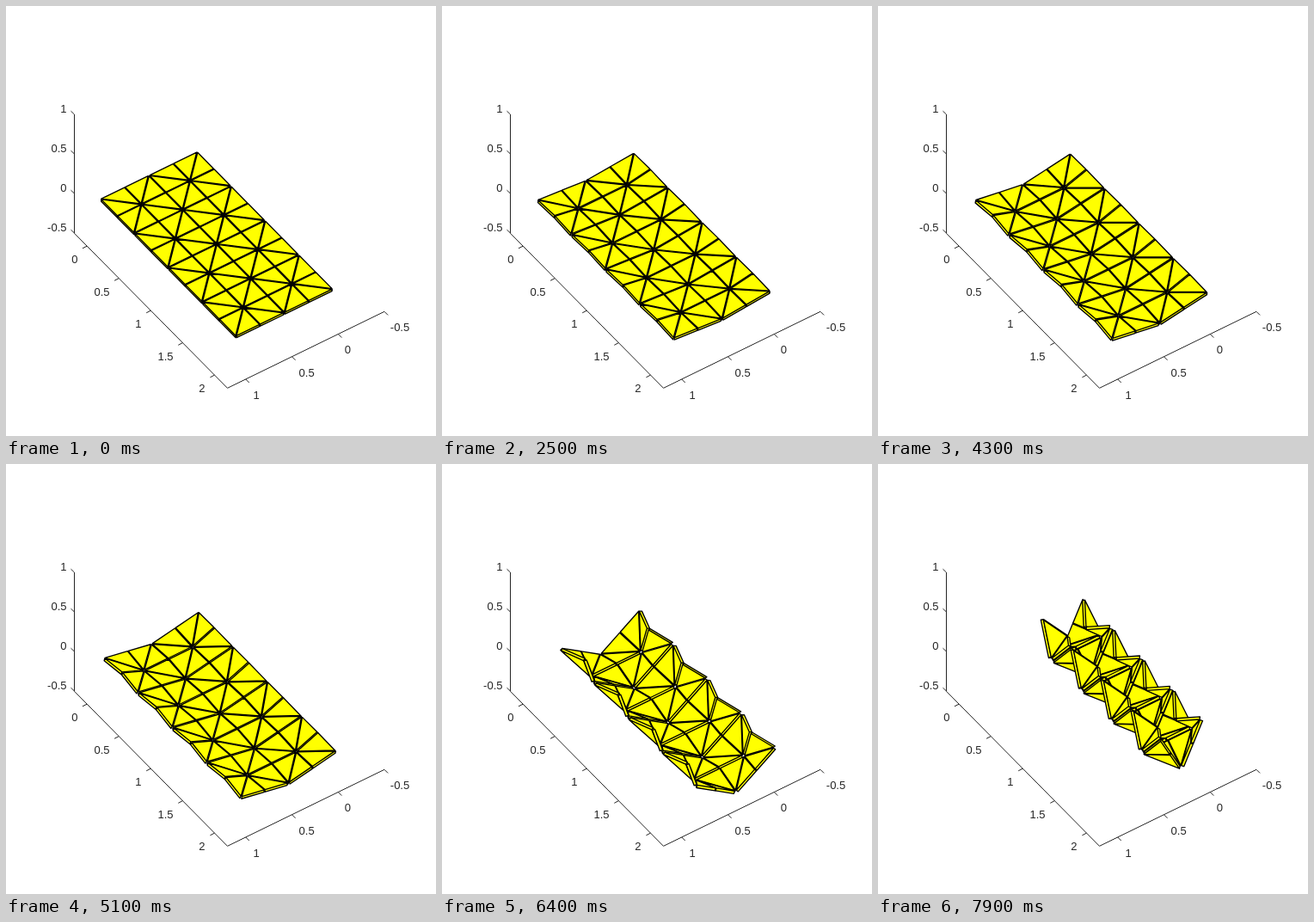
Animation, 500 px wide and 500 px high, one loop 8 s. Source, as an HTML page:

```html
<!DOCTYPE html>
<html lang="en">
<head>
<meta charset="utf-8">
<title>Folding thick panels</title>
<style>
html, body { margin: 0; width: 100%; height: 100%; overflow: hidden; background: #fff; }
svg { display: block; width: 100%; height: 100%; }
text { font: 13px "Liberation Sans", Arial, sans-serif; fill: #262626; }
#axes { fill: none; stroke: #262626; stroke-width: 1; }
#sheet { fill: #ff0; stroke: #000; stroke-width: 1.35; stroke-linejoin: round; }
</style>
</head>
<body>
<svg viewBox="0 0 500 500">
  <path id="axes"/>
  <g id="labels"></g>
  <g id="sheet"></g>
</svg>
<script>
const NS = "http://www.w3.org/2000/svg";
const LOOP = 8000, STEP = 100, HOLD = 4;
const COLS = 4, ROWS = 8;
const A = 0.2625, H = 0.2665, THICK = 0.025, INSET = 0.945;
const VIEW = [0.402, 0.584, 0.705];

const add = (tag, parent) => parent.appendChild(document.createElementNS(NS, tag));
const dot = (a, b) => a[0] * b[0] + a[1] * b[1] + a[2] * b[2];
const sub = (a, b) => a.map((v, i) => v - b[i]);
const cross = (a, b) => [a[1] * b[2] - a[2] * b[1], a[2] * b[0] - a[0] * b[2], a[0] * b[1] - a[1] * b[0]];
const project = ([x, y, z]) => [-107.6 * x + 74 * y, 52.4 * x + 75 * y - 92 * z];

function drawAxes() {
  const labels = document.getElementById("labels");
  let d = "M79.5 126V264.3L257.5 444.3L440 355.3";
  const tick = (x, y, dx, dy) => { d += `M${x} ${y}l${dx} ${dy}`; };
  const label = (str, x, y, anchor) => {
    const el = add("text", labels);
    el.setAttribute("x", x);
    el.setAttribute("y", y);
    el.setAttribute("text-anchor", anchor);
    el.textContent = str;
  };
  ["1", "0.5", "0", "-0.5"].forEach((s, i) => {
    tick(79.5, 126 + 46 * i, -4, -3.8);
    label(s, 70.5, 124 + 46 * i, "end");
  });
  ["0", "0.5", "1", "1.5", "2"].forEach((s, i) => {
    tick(94 + 37.1 * i, 279.2 + 37.5 * i, -5, 2.6);
    label(s, 83.5 + 37 * i, 299.2 + 37.5 * i, "end");
  });
  ["1", "0.5", "0", "-0.5"].forEach((s, i) => {
    tick(278.7 + 53.8 * i, 434 - 26.2 * i, 4, 4);
    label(s, 287.5 + 53.1 * i, 457 - 26.4 * i, "start");
  });
  document.getElementById("axes").setAttribute("d", d);
}

// Each cell holds two right triangles; the diagonal joins its even corners.
const panels = [];
for (let k = 0; k < ROWS; k++) {
  for (let i = 0; i < COLS; i++) {
    const a = [i, k], b = [i + 1, k], c = [i + 1, k + 1], e = [i, k + 1];
    const pair = (i + k) % 2 ? [[a, b, e], [b, c, e]] : [[a, b, c], [a, c, e]];
    pair.forEach(tri => panels.push({ tri, k }));
  }
}
const sheet = document.getElementById("sheet");
const paths = panels.map(() => add("path", sheet));

// Tilt of every panel in degrees: a slow start, then a fast fold.
const tiltAt = n => n < 51 ? n * 6.8 / 51 : 6.8 + (n - 51) * 1.385;

// Pull a triangle in evenly from its edges, around its incentre.
function inset(p) {
  const len = p.map((_, i) => Math.hypot(...sub(p[(i + 1) % 3], p[(i + 2) % 3])));
  const sum = len[0] + len[1] + len[2];
  const mid = [0, 1, 2].map(c => p.reduce((s, q, i) => s + q[c] * len[i], 0) / sum);
  return p.map(q => q.map((v, c) => mid[c] + (v - mid[c]) * INSET));
}

function drawSheet(n) {
  const tilt = Math.max(tiltAt(n), 0.01) * Math.PI / 180;
  const alpha = 2 * Math.atan(H * Math.sin(tilt) / A);
  const sin = Math.sin(alpha), cos = Math.cos(alpha);
  const R = A / sin;
  const h = H * Math.cos(tilt), gap = 2 * THICK * Math.sin(tilt);
  const ox = 166 + 5.5 * sin + 73 * (1 - cos);
  const oy = 196.8 + 15.5 * sin - 71 * (1 - cos);

  const place = (i, j, k) => {
    const psi = (i - 2) * alpha;
    const r = (i + j) % 2 ? R * cos : R;
    return [r * Math.sin(psi), k * gap + j * h, R - r * Math.cos(psi) - 2 * A * sin];
  };
  const outline = pts => "M" + pts.map(p => {
    const [x, y] = project(p);
    return (x + ox).toFixed(2) + " " + (y + oy).toFixed(2);
  }).join("L") + "Z";

  const solids = panels.map(({ tri, k }) => {
    const top = inset(tri.map(([i, j]) => place(i, j, k)));
    let nrm = cross(sub(top[1], top[0]), sub(top[2], top[0]));
    const size = Math.hypot(...nrm);
    nrm = nrm.map(v => v / size);
    const low = top.map(p => p.map((v, c) => v - THICK * nrm[c]));
    let d = outline(dot(nrm, VIEW) > 0 ? top : low);
    for (let i = 0; i < 3; i++) {
      const m = (i + 1) % 3;
      if (dot(cross(sub(top[m], top[i]), nrm), VIEW) > 0)
        d += outline([top[i], top[m], low[m], low[i]]);
    }
    const depth = [...top, ...low].reduce((s, p) => s + dot(p, VIEW), 0);
    return { d, depth };
  });
  solids.sort((a, b) => a.depth - b.depth);
  solids.forEach((s, i) => paths[i].setAttribute("d", s.d));
}

let last = -1;
function frame() {
  const n = Math.max(0, Math.floor(performance.now() % LOOP / STEP) - HOLD);
  if (n !== last) drawSheet(last = n);
  requestAnimationFrame(frame);
}

drawAxes();
frame();
</script>
</body>
</html>
```
